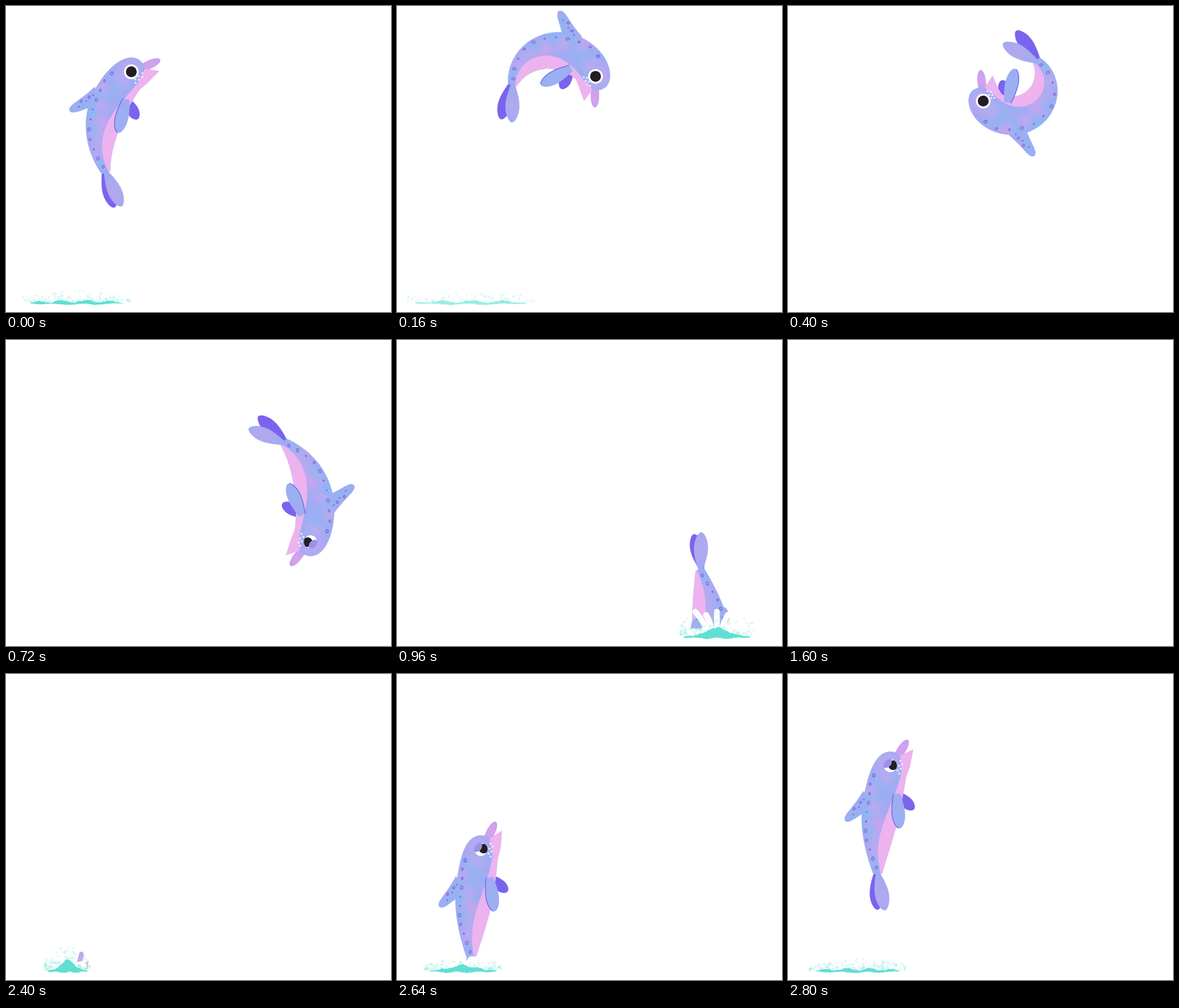
An HTML page with a canvas for the animation above (2880 ms loop, 600 px wide and 478 px high).

```html
<!DOCTYPE html>
<html lang="en">
<head>
<meta charset="utf-8">
<title>Somersaulting dolphin</title>
<style>
  html, body { margin: 0; width: 100%; height: 100%; overflow: hidden; background: #fff; }
  canvas { display: block; }
</style>
</head>
<body>
<canvas id="stage" width="600" height="478"></canvas>
<script>
const ctx = document.getElementById('stage').getContext('2d');
const STEP = 80, LOOP = 2880, HALF = 95, WATER = 461;
const SKIN = '#a1abf1', DARK = '#7a64ee', PINK = '#ecb3ee', TEAL = '#5fe0d2';
const rad = d => d * Math.PI / 180;
const rnd = n => { const v = Math.sin(n * 127.1 + 3.7) * 43758.5453; return v - Math.floor(v); };

// step, centre x, centre y, heading, curl of each half, fin sweep
const KEYS = [
  [-6, 86, 552, 6, 8, 8],
  [-1, 147, 218, 8, 11, 8],
  [0, 165, 170, 18, 36, 8],
  [2, 248, 90, 92, 80, 14],
  [5, 361, 144, 243, 105, 24],
  [7, 380, 128, 450, 45, 20],
  [9, 469, 242, 529, 38, 20],
  [12, 488, 452, 532, 5, -14],
  [14, 490, 610, 532, 5, -14]
];

let pose;

// Smooth cubic path through the keys
function poseAt(step) {
  const i = KEYS.findIndex(k => k[0] >= step);
  if (i < 0) return null;
  const j = Math.max(1, i), key = n => KEYS[Math.max(0, Math.min(KEYS.length - 1, n))];
  const a = key(j - 1), b = key(j), span = b[0] - a[0], t = (step - a[0]) / span;
  const slope = (n, c) => (key(n + 1)[c] - key(n - 1)[c]) / (key(n + 1)[0] - key(n - 1)[0]) * span;
  const [, x, y, heading, bend, sweep] = a.map((v, c) => {
    const d = b[c] - v, p = slope(j - 1, c), q = slope(j, c);
    return v + t * (p + t * (3 * d - 2 * p - q + t * (p + q - 2 * d)));
  });
  const h = rad(heading), curl = rad(bend);
  // The middle of the back lies outside the centre of mass of a curled body
  const out = HALF / curl * (1 - Math.sin(curl) / curl);
  return { x: x - out * Math.cos(h), y: y - out * Math.sin(h), h, curl, sweep, flap: Math.max(0, bend - 35) };
}

// u runs along the heading, v towards the belly
const put = (f, u, v) => [
  f.x + u * Math.sin(f.h) + v * Math.cos(f.h),
  f.y + v * Math.sin(f.h) - u * Math.cos(f.h)
];

// The spine is an arc, straight beyond its ends
function spine(u) {
  const d = Math.max(-HALF, Math.min(HALF, u)), turn = pose.curl * d / HALF;
  const chord = turn ? d * Math.sin(turn / 2) / (turn / 2) : 0;
  const [x, y] = put({ x: pose.x, y: pose.y, h: pose.h + turn / 2 }, chord, 0);
  const h = pose.h + turn, [ex, ey] = put({ x, y, h }, u - d, 0);
  return { x: ex, y: ey, h };
}

const at = (u, v) => put(spine(u), 0, v);
const bodyU = s => -HALF + 193 * s;

function girth(u) {
  const s = Math.max(0, Math.min(1, (u + HALF) / 193));
  return (7 + 23 * Math.sin(Math.min(1, s * 1.7) * Math.PI / 2)) * Math.sqrt(1 - s ** 10);
}

function fill(points, color) {
  ctx.beginPath();
  for (const p of points) ctx.lineTo(...p);
  ctx.closePath();
  ctx.fillStyle = color;
  ctx.fill();
}

function dot(x, y, r, color) {
  ctx.beginPath();
  ctx.arc(x, y, r, 0, 7);
  ctx.fillStyle = color;
  ctx.fill();
}

function glow([x, y], r, rgb) {
  const g = ctx.createRadialGradient(x, y, 0, x, y, r);
  g.addColorStop(0, `rgba(${rgb},.7)`);
  g.addColorStop(1, `rgba(${rgb},0)`);
  dot(x, y, r, g);
}

function spot([x, y], r, color = '#8f63d6') {
  if (r < 1.7) return dot(x, y, r, color);
  ctx.beginPath();
  ctx.ellipse(x, y, r * .75, r, pose.h, 0, 7);
  ctx.strokeStyle = color;
  ctx.lineWidth = 1.3;
  ctx.stroke();
}

// A leaf rooted at (u, v); 0 degrees points to the tail, 90 to the belly
function fin(u, v, degrees, length, wide, root, color, tint) {
  const f = spine(u), c = Math.cos(rad(degrees)), s = Math.sin(rad(degrees)), n = 14;
  const on = (along, side) => put(f, side * s - along * c, v + along * s + side * c);
  const edge = [];
  for (let i = -n; i <= n; i++) {
    const t = Math.cos(i / n * Math.PI / 2);
    const w = wide * (root + (1 - root) * Math.sin(2.2 * t)) * Math.sqrt(Math.max(0, 1 - t ** 4));
    edge.push(on(t * length, Math.sign(i) * w));
  }
  fill(edge, color);
  if (tint) {
    ctx.save();
    ctx.clip();
    glow(on(length * .6, 0), length * .45, tint);
    ctx.restore();
  }
  return { on, edge: edge.slice(0, n) };
}

function body() {
  const back = [], belly = [], inner = [];
  for (let i = 0; i <= 40; i++) {
    const u = bodyU(Math.sin(i / 40 * Math.PI / 2)), w = girth(u);
    back.push(at(u, -w));
    belly.unshift(at(u, w));
    inner.push(at(u, 10 + 9 * Math.sin(u / 38)));
  }
  fill([...back, ...belly], SKIN);
  ctx.save();
  ctx.clip();
  for (let i = 0; i < 15; i++)
    glow(at(90 - i * 12, -22 + 30 * rnd(i)), 17 + 10 * rnd(i + 40), i % 2 ? '224,160,238' : '132,186,245');
  fill([...inner, ...belly], PINK);
  ctx.restore();
  fill([[55, 27], [84, 29], [112, 25], [96, 9], [78, 16]].map(p => at(...p)), PINK);

  for (let i = 0; i < 11; i++) {
    const u = 55 - i * 14;
    spot(at(u, 4 + 5 * rnd(i + 9) - girth(u)), i % 3 ? 1.3 + rnd(i + 2) : 2.6, i ? undefined : '#5a6ee6');
  }
}

function eye(sleepy) {
  const f = spine(76), [x, y] = put(f, 0, -1);
  dot(x, y, 11.5, sleepy ? SKIN : '#fff');
  if (!sleepy) return dot(x, y, 8.5, '#231d24');
  ctx.save();
  ctx.beginPath();
  ctx.arc(x, y, 10.5, 0, 7);
  ctx.clip();
  dot(x, y, 10.5, '#fff');
  dot(...put(f, 2, 3), 7.5, '#231d24');
  dot(...put(f, 4, -10), 10, '#9a91e8');
  ctx.restore();
}

function dolphin(step) {
  pose = poseAt(step);
  if (!pose) return;
  const { sweep, flap } = pose;
  ctx.save();
  ctx.beginPath();
  ctx.rect(0, 0, 600, WATER);
  ctx.clip();

  fin(-91, -3, 0, 60, 12, .2, DARK);
  fin(35, 20, 60 + .8 * flap, 36, 10, .5, DARK);
  fin(88, 4, 166, 36, 7, .8, '#c3a2ee', '224,160,238');
  const dorsal = fin(20, -20, -25 - 1.5 * sweep, 52, 9, 1.7, SKIN, '140,182,242');
  body();
  for (let i = 0; i < 5; i++) spot(dorsal.on(8 + i * 7, 10 * rnd(i + 5) - 5), i % 2 ? 2 : 1.3);
  eye(step < 0 || step > 7);
  for (let i = 0; i < 6; i++) dot(...at(88 - i * 4, 12 + i % 2 * 4), 1.5, '#f7ecff');

  fin(-91, 0, sweep, 62, 12, .2, SKIN, '190,166,238');
  const flipper = fin(35, 20, 12 + .6 * sweep + .9 * flap, 54, 11, .5, SKIN, '150,180,242');
  ctx.beginPath();
  for (const p of flipper.edge) ctx.lineTo(...p);
  ctx.strokeStyle = '#5f70ea';
  ctx.lineWidth = 1.3;
  ctx.stroke();
  ctx.restore();
}

// White jets, pale foam and a turquoise mound that flattens, spreads and fades
function splash(cx, age, life, width, height) {
  if (age < 0 || age >= life) return;
  const young = Math.max(0, 1 - age / 5), fade = Math.min(1, (life - age) / (life * .45));
  ctx.save();
  ctx.lineCap = 'round';
  ctx.strokeStyle = '#fff';
  if (young) {
    for (let i = -2; i <= 2; i++) {
      ctx.lineWidth = 9;
      ctx.beginPath();
      ctx.moveTo(cx + i * width * .12, 458);
      ctx.quadraticCurveTo(cx + i * width * .15, 442, cx + i * width * .28, 458 - 42 * young + 5 * (i & 1));
      ctx.stroke();
    }
    for (let i = -5; i <= 5; i++) dot(cx + i * width * .12, 457, 6 + 3 * rnd(i + 20), '#fff');
  }
  ctx.globalAlpha = fade;
  for (let i = 0; i < 150; i++) {
    const n = i + age * 151, x = rnd(n) * 2 - 1;
    const rise = rnd(n + .3) ** 2 * height * (1 - .6 * x * x);
    dot(cx + x * width, 462 - rise, .7 + 2 * rnd(n + .6), `rgba(130,232,218,${.1 + .25 * rnd(n + .8)})`);
  }
  const top = [], bottom = [];
  for (let i = 0; i <= 40; i++) {
    const x = i / 20 - 1, env = Math.sqrt(1 - x * x), px = cx + x * width * .88;
    const mound = 15 * young * Math.exp(-7 * x * x);
    top.push([px, 464 - mound - env * (2 + 2 * Math.sin(i * .6 + age) * (1 - young) + 2 * rnd(i + age * 31))]);
    bottom.unshift([px, 464 + env * (1.5 + Math.sin(i * .5 + age) + rnd(i + age * 17))]);
  }
  fill([...top, ...bottom], TEAL);
  ctx.restore();
}

function draw(now) {
  let step = Math.floor(now % LOOP / STEP);
  if (step >= 30) step -= 36;
  ctx.fillStyle = '#fff';
  ctx.fillRect(0, 0, 600, 478);
  if (step >= 20) return;
  const rise = step + 6, dive = step - 11;
  dolphin(step);
  splash(96 + 2.4 * rise, rise, 11, 36 + 8 * rise, rise < 3 ? 36 : 18);
  splash(498 + dive * .5, dive, 9, 55 + 5.2 * dive, 44 - 3 * dive);
}

const start = performance.now();
function tick() {
  draw(performance.now() - start);
  requestAnimationFrame(tick);
}
tick();
</script>
</body>
</html>
```
